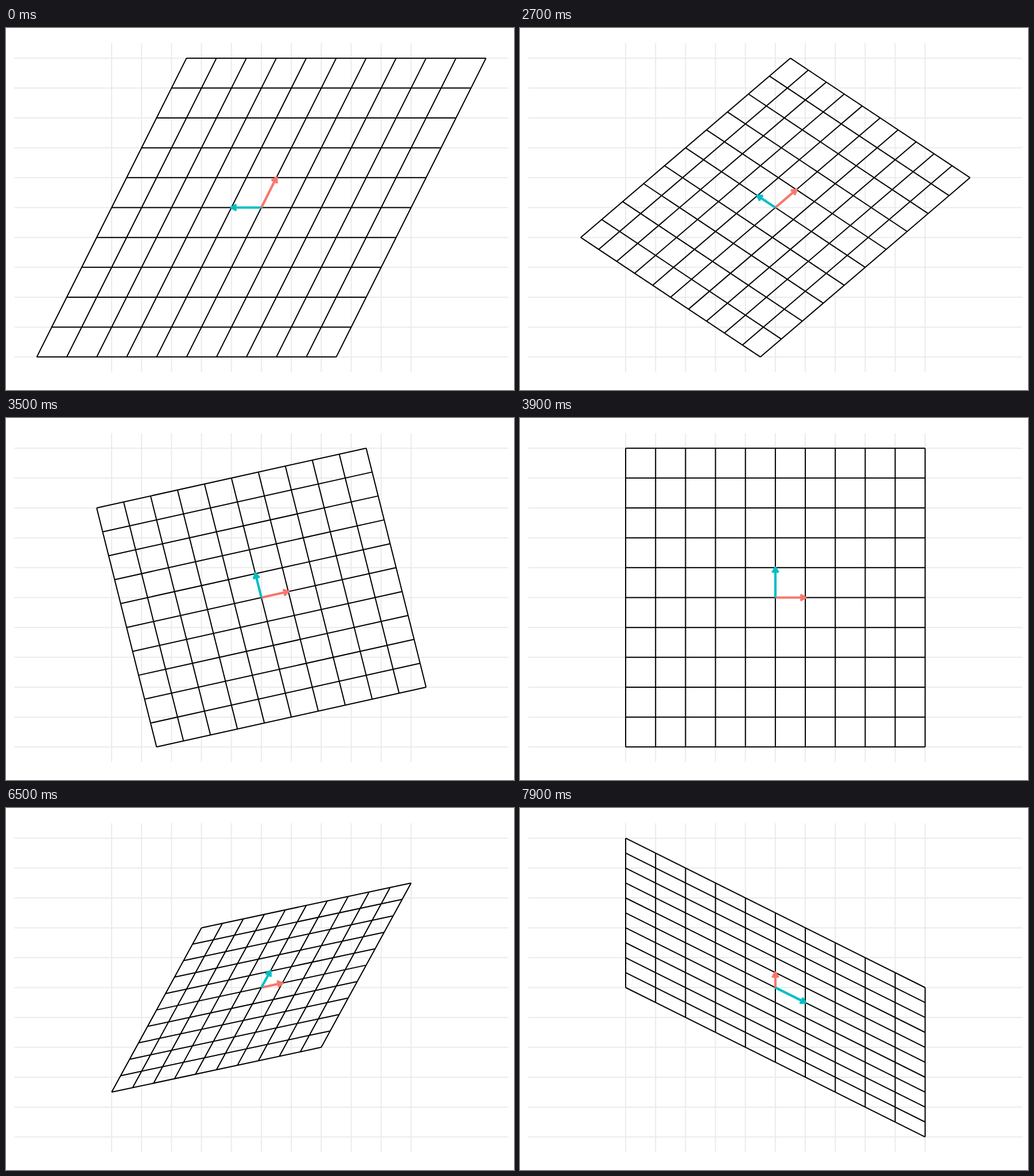
An HTML page that plays this animation: 885 px wide and 632 px high, repeating every 10000 ms.

```html
<!DOCTYPE html>
<html lang="en">
<head>
<meta charset="utf-8">
<title>Linear transformation of a grid</title>
<style>
  html, body { margin: 0; width: 100%; height: 100%; overflow: hidden; background: #fff; }
  svg { display: block; width: 100%; height: 100%; }
  path { fill: none; stroke-width: 2; stroke-linejoin: round; }
  #backdrop { stroke: #ebebeb; }
  #grid { stroke: #000; }
  .vector { stroke-width: 4.2; }
  #first { stroke: #f8766d; }
  #second { stroke: #00bfc4; }
</style>
</head>
<body>
<svg viewBox="0 0 885 632">
  <path id="backdrop"/>
  <path id="grid"/>
  <path id="first" class="vector"/>
  <path id="second" class="vector"/>
</svg>
<script>
const LOOP = 10000, STEP = 100, STEPS = 20;
const ORIGIN = [444.9, 313.5], UNIT = 52.17, HALF = 5;
const HEAD = 10, HEAD_ANGLE = Math.PI / 6;
const PANEL = { left: 14.5, right: 875.1, top: 26.6, bottom: 600.4 };

// Each basis holds the images of both unit vectors: [x1, y1, x2, y2].
const SHEARED = [0.5, 1, -1, 0];
const IDENTITY = [1, 0, 0, 1];
const FLATTENED = [0, 0.5, 1, -0.5];
const MOVES = [
  { start: 2000, from: SHEARED, to: IDENTITY },
  { start: 6000, from: IDENTITY, to: FLATTENED },
];

const ticks = Array.from({ length: 2 * HALF + 1 }, (_, i) => i - HALF);
const toScreen = (x, y) => [ORIGIN[0] + x * UNIT, ORIGIN[1] - y * UNIT];
const polyline = points => 'M' + points.map(p => p.map(v => v.toFixed(2)).join(' ')).join('L');
const setPath = (id, d) => document.getElementById(id).setAttribute('d', d);

function basisAt(time) {
  const { start, from, to } = time < MOVES[1].start ? MOVES[0] : MOVES[1];
  const step = Math.floor((time - start) / STEP) + 1;
  const progress = Math.min(STEPS, Math.max(0, step)) / STEPS;
  return from.map((v, i) => v + (to[i] - v) * progress);
}

function backdropPath() {
  return ticks.map(k => {
    const [x, y] = toScreen(k, k);
    return polyline([[x, PANEL.top], [x, PANEL.bottom]]) +
           polyline([[PANEL.left, y], [PANEL.right, y]]);
  }).join('');
}

function gridPath([x1, y1, x2, y2]) {
  const map = (a, b) => toScreen(a * x1 + b * x2, a * y1 + b * y2);
  return ticks.map(k =>
    polyline([map(k, -HALF), map(k, HALF)]) +
    polyline([map(-HALF, k), map(HALF, k)])
  ).join('');
}

function arrowPath(x, y) {
  const tip = toScreen(x, y);
  const back = Math.atan2(y, -x);
  const barb = turn => [
    tip[0] + HEAD * Math.cos(back + turn),
    tip[1] + HEAD * Math.sin(back + turn),
  ];
  return polyline([ORIGIN, tip]) + polyline([barb(HEAD_ANGLE), tip, barb(-HEAD_ANGLE)]);
}

function draw(time) {
  const basis = basisAt(time);
  setPath('grid', gridPath(basis));
  setPath('first', arrowPath(basis[0], basis[1]));
  setPath('second', arrowPath(basis[2], basis[3]));
}

const begin = performance.now();
function tick() {
  draw((performance.now() - begin) % LOOP);
  requestAnimationFrame(tick);
}

setPath('backdrop', backdropPath());
tick();
</script>
</body>
</html>
```
